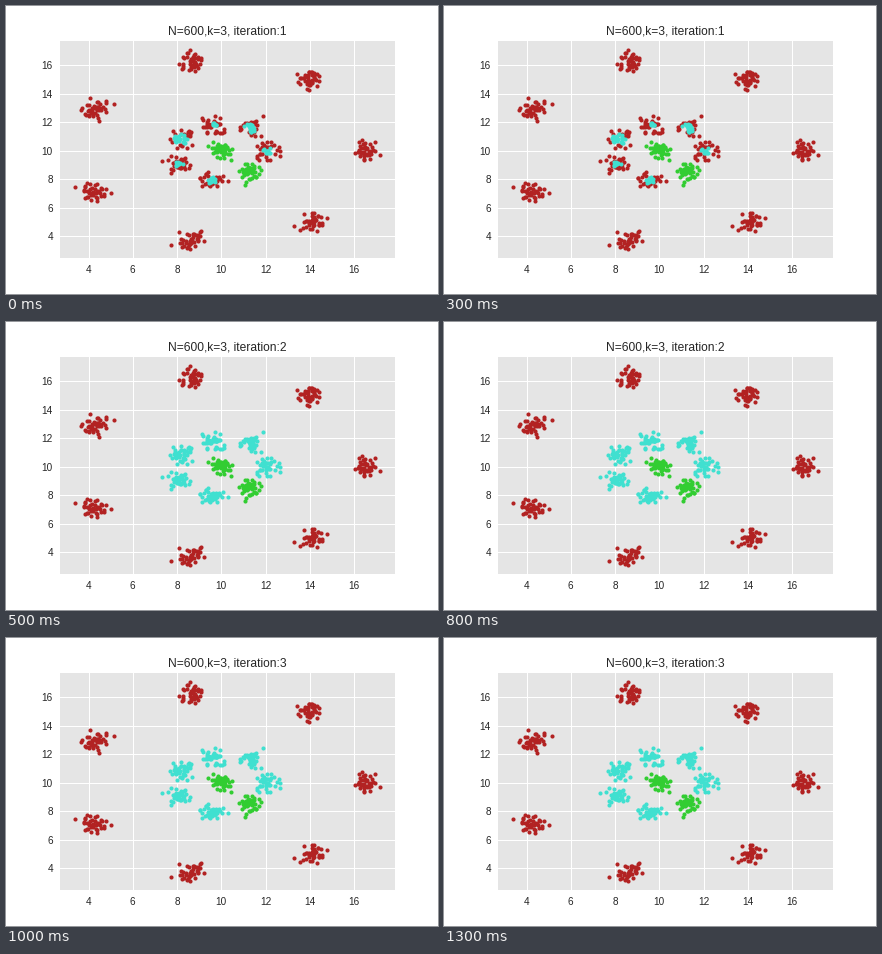
These frames come from a looping animation (432x288 px, 1500 ms). A matplotlib script:

```python
import numpy as np
import matplotlib.pyplot as plt
from matplotlib.animation import FuncAnimation

plt.rcParams["font.family"] = "Liberation Sans"
INK = "#262626"
PER_CLUSTER = 40
SPREAD = (0.27, 0.31)

OUTER = [(8.66, 16.25), (4.23, 12.83), (4.27, 7.1), (8.68, 3.72),
         (14.1, 5.02), (16.42, 9.97), (14.02, 14.95)]
RING = [(9.65, 11.83), (8.13, 10.83), (8.1, 9.08),
        (9.52, 7.98), (12.12, 10.0), (11.28, 11.62)]
CORE = [(9.93, 10.08), (11.24, 8.46)]
CENTERS = np.array(OUTER + RING + CORE)

# How many points of each ring cluster join the second group at once
EARLY = [8, 20, 10, 14, 11, 20]

STRAYS = np.array([
    (5.15, 13.27), (4.07, 13.69), (3.66, 12.85), (4.47, 12.08),
    (3.39, 7.46), (4.38, 7.67), (5.02, 7.04),
    (7.73, 3.41), (8.09, 4.31), (9.08, 4.38),
    (13.29, 4.75), (14.78, 5.29), (14.1, 5.64),
    (17.17, 9.7), (16.95, 10.61), (16.36, 10.75),
    (13.42, 15.37), (13.96, 14.25),
    (8.59, 17.05), (8.81, 15.58), (8.09, 16.07),
    (11.89, 12.43), (9.72, 12.43), (7.32, 9.28), (7.73, 8.44),
    (12.65, 9.98), (11.07, 7.6), (10.44, 9.35), (10.3, 7.88),
])


def nearest_center(points):
    gaps = points[:, None, :] - CENTERS[None, :, :]
    return np.hypot(gaps[..., 0], gaps[..., 1]).argmin(axis=1)


def make_clusters(seed=15):
    rng = np.random.default_rng(seed)
    owner = nearest_center(STRAYS)
    clusters = []
    for i, center in enumerate(CENTERS):
        own = STRAYS[owner == i]
        noise = rng.normal(size=(PER_CLUSTER - len(own), 2)).clip(-2, 2)
        clusters.append(np.vstack([center + noise * SPREAD, own]))
    return clusters


def split_ring(clusters):
    early, late = [], []
    for points, center, count in zip(clusters, RING, EARLY):
        order = np.hypot(*(points - center).T).argsort()
        early.append(points[order[:count]])
        late.append(points[order[count:]])
    return np.vstack(early), np.vstack(late)


clusters = make_clusters()
first_core = len(OUTER) + len(RING)
outer = np.vstack(clusters[:len(OUTER)])
ring = clusters[len(OUTER):first_core]
core = np.vstack(clusters[first_core:])
early, late = split_ring(ring)

STEPS = [
    (np.vstack([outer, late]), early, core),
    (outer, np.vstack(ring), core),
    (outer, np.vstack(ring), core),
]

fig, ax = plt.subplots(figsize=(6, 4), dpi=72, facecolor="white")
fig.subplots_adjust(left=0.125, right=0.9, bottom=0.125, top=0.88)
ax.set_facecolor("#E5E5E5")
ax.set(xlim=(2.712, 17.84), ylim=(2.495, 17.71),
       xticks=range(4, 17, 2), yticks=range(4, 17, 2))
ax.grid(color="white", linewidth=1)
ax.set_axisbelow(True)
ax.tick_params(length=0, pad=7, labelsize=10, labelcolor=INK)
for spine in ax.spines.values():
    spine.set_visible(False)

title = ax.set_title("", fontsize=12, color=INK, pad=6)
groups = [ax.scatter([], [], s=17, color=c, linewidths=0, zorder=3)
          for c in ("firebrick", "turquoise", "limegreen")]


def draw(step):
    title.set_text(f"N=600,k=3, iteration:{step + 1}")
    for group, points in zip(groups, STEPS[step]):
        group.set_offsets(points)
    return [title, *groups]


anim = FuncAnimation(fig, draw, frames=len(STEPS), interval=500,
                     repeat=True, repeat_delay=0)
plt.show()
```
